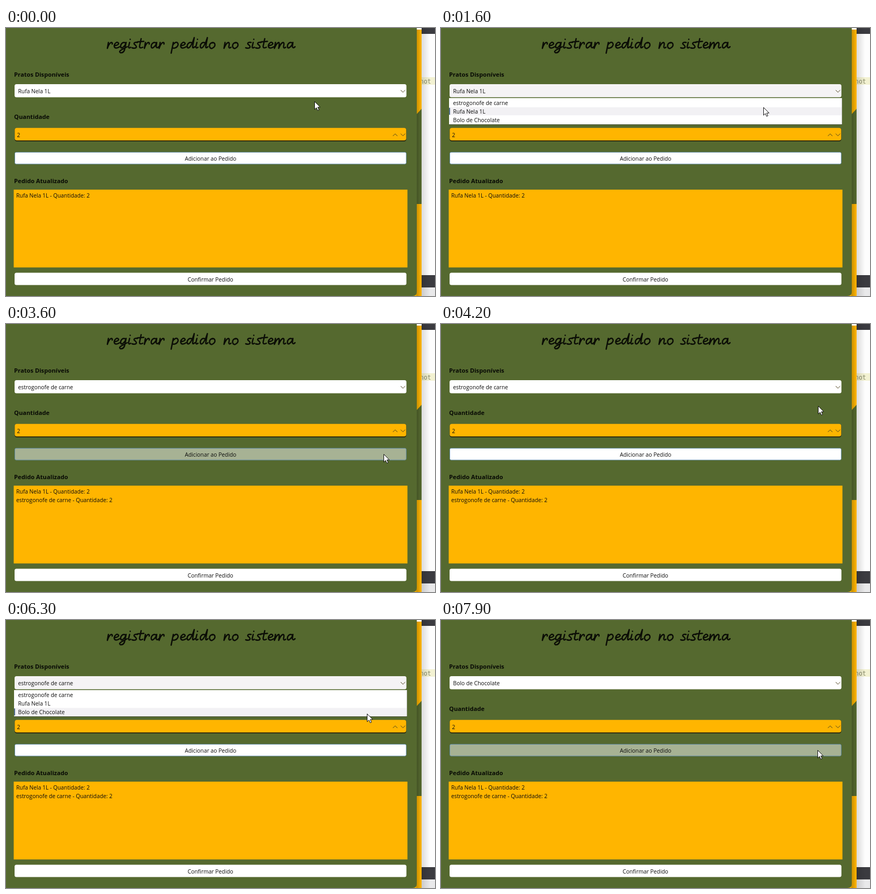
Write an HTML page that moves like this. It is 800x501 px and loops after 8000 ms.

```html
<!DOCTYPE html>
<html lang="pt-BR">
<head>
<meta charset="utf-8">
<title>Registrar pedido</title>
<style>
  html, body { margin: 0; width: 100%; height: 100%; overflow: hidden; background: #fff; }
  svg { display: block; width: 800px; height: 501px; }
  text { font: 10.3px "Open Sans", "Noto Sans", sans-serif; fill: #0c0c0c; white-space: pre; }
  .label { font-size: 11.2px; font-weight: 700; fill: #080a05; }
  .mid { text-anchor: middle; }
  .code { font: 11.5px "DejaVu Sans Mono", monospace; fill: #8b8d6c; }
  .heading { font: italic 28px "Open Sans", sans-serif; fill: transparent; }
  .pen { fill: none; stroke: #0b0d06; stroke-width: 2.5; stroke-linecap: round; stroke-linejoin: round; }
  .chevron { fill: none; stroke: #4f431f; }
  .field { fill: #fff; }
  .orange { fill: #ffb500; }
  .green { fill: #55692f; }
  .dark { fill: #3b3b40; }
</style>
</head>
<body>
<svg viewBox="0 0 800 501">
  <defs>
    <linearGradient id="shade">
      <stop offset="0" stop-color="#000" stop-opacity=".22"/>
      <stop offset="1" stop-color="#000" stop-opacity="0"/>
    </linearGradient>
  </defs>

  <!-- windows behind the dialog -->
  <rect x="760" width="40" height="501" fill="#fdfdfd"/>
  <rect class="dark" x="775" width="25" height="11"/>
  <rect x="774" y="92" width="26" height="14" fill="#f3f2d2"/>
  <text class="code" x="772" y="103.5">not</text>
  <rect class="dark" x="774" y="462" width="26" height="23"/>
  <rect x="774" y="485" width="26" height="16" fill="#e9e9ea"/>
  <rect x="775" width="16" height="501" fill="url(#shade)" opacity=".6"/>
  <rect class="orange" x="750" y="3" width="25" height="498"/>
  <path class="green" d="M764 163L775 151V329H764Z"/>
  <rect x="765" y="3" width="10" height="498" fill="url(#shade)"/>

  <!-- dialog -->
  <path class="green" d="M0 0H766V493Q766 501 758 501H0Z"/>
  <text class="heading mid" x="364" y="39">registrar pedido no sistema</text>
  <g id="title" class="pen"></g>

  <text class="label" x="15" y="90.5">Pratos Disponíveis</text>
  <rect id="combo" x="16" y="105" width="730.7" height="24.4" rx="3.5"/>
  <text id="choice" x="22.5" y="122"></text>
  <path class="chevron" d="M736 116l4.2 4.2l4.2-4.2"/>

  <text class="label" x="15" y="170">Quantidade</text>
  <rect x="16.3" y="187" width="730" height="24.8" rx="4" fill="#17160a"/>
  <rect class="orange" x="16.3" y="186.8" width="730" height="23.5" rx="4"/>
  <text x="20.5" y="203.5">2</text>
  <path class="chevron" d="M721.5 202l4.2-4.2l4.2 4.2M736 197.5l4.2 4.2l4.2-4.2"/>

  <rect id="add" x="16.5" y="232.3" width="729.8" height="21.9" rx="2.5" stroke="#5a8cb8" stroke-width=".8"/>
  <text class="mid" x="381.5" y="247.8">Adicionar ao Pedido</text>

  <text class="label" x="15" y="289.5">Pedido Atualizado</text>
  <rect class="orange" x="14.4" y="302.2" width="734.2" height="145.4"/>
  <text id="first" x="19" y="316.8"></text>
  <text id="second" x="19" y="333"></text>

  <rect class="field" x="16" y="457.6" width="730.7" height="23" rx="3.5"/>
  <text class="mid" x="381.3" y="473.8">Confirmar Pedido</text>

  <g id="menu">
    <rect x="15" y="131" width="733" height="50" fill="#2b3519"/>
    <rect class="field" x="15" y="131" width="732.7" height="49.2"/>
    <g id="mark">
      <rect x="16" width="731" height="15" fill="#f2f1f4"/>
      <rect x="15" y="1" width="2" height="13" fill="#54708f"/>
    </g>
    <g id="options"></g>
  </g>

  <g id="pointer">
    <path id="arrow" d="M0 0V14.6L3.4 11.4L5.7 16.7L8.1 15.6L5.8 10.5H10.4Z" fill="#fff" stroke="#111"/>
    <path id="beam" d="M-3-6.5H-.7L0-6L.7-6.5H3M0-6V6M-3 6.5H-.7L0 6L.7 6.5H3" fill="none" stroke="#3c3420"/>
  </g>
</svg>
<script>
const $ = id => document.getElementById(id);
const LOOP = 8000, STEP = 100;
const dishes = ["estrogonofe de carne", "Rufa Nela 1L", "Bolo de Chocolate"];
const orderLine = i => dishes[i] + " - Quantidade: 2";

// Pen strokes per letter, baseline at 0, with the advance width.
const bowl = "M10-10Q4-13 1-6Q0 0 4-1Q9-4 ";
const glyphs = {
  r: [12, "M2-11L0 0Q3-9 7-11Q10-11 9-8"],
  e: [12, "M1-5Q9-6 9-9Q8-12 5-11Q0-8 1-3Q3 2 11-3"],
  g: [15.5, bowl + "11-11L8 3Q6 9 0 8Q-3 6 2 3L13-3"],
  i: [7.5, "M2-11L0-3Q0 1 4-2M3-17l.2.3"],
  s: [11, "M9-11Q2-12 3-8Q8-4 7-2Q5 1-1-1"],
  t: [11, "M5-18L2-4Q2 1 8-2M-2-12L10-13"],
  a: [15.5, bowl + "11-11L10-3Q11 1 15-3"],
  p: [16, "M3-11L-1 9M2-6Q6-12 10-11Q14-8 10-3Q6 1 1-1"],
  d: [17, bowl + "14-20L11-3Q11 1 15-3"],
  o: [14.5, "M7-11Q1-10 1-4Q2 1 6 0Q12-3 11-8Q9-12 6-10"],
  n: [15, "M2-11L0 0Q4-10 8-11Q11-11 9-3Q9 1 13-2"],
  m: [23.5, "M2-11L0 0Q4-10 8-11Q10-11 8 0Q12-10 16-11Q19-11 17-3Q17 1 21-2"]
};

function write(word, x) {
  return [...word].map(c => {
    const [width, d] = glyphs[c];
    const path = `<path transform="translate(${x} 38)" d="${d}"/>`;
    x += width;
    return path;
  }).join("");
}

$("title").innerHTML = write("registrar", 189) + write("pedido", 309) +
  write("no", 406.5) + write("sistema", 448);
$("options").innerHTML = dishes.map((dish, i) =>
  `<text x="22.5" y="${144 + i * 16.2}">${dish}</text>`).join("");
$("first").textContent = orderLine(1);

// time, x, y
const route = [
  [0, 575, 137], [400, 590, 120], [1000, 590, 120], [1300, 601, 146],
  [1600, 601, 148], [1900, 605, 141], [2200, 605, 141], [2800, 718, 196],
  [3200, 705, 243], [3700, 704, 243], [4200, 703, 153], [4700, 690, 119],
  [5000, 690, 119], [5500, 673, 182], [6300, 673, 175], [6700, 673, 174],
  [7300, 702, 243], [LOOP, 702, 243]
];

function pointerAt(t) {
  const i = route.findIndex(p => p[0] > t);
  const [t0, x0, y0] = route[i - 1], [t1, x1, y1] = route[i];
  const u = (t - t0) / (t1 - t0), k = u * u * (3 - 2 * u);
  return [x0 + (x1 - x0) * k, y0 + (y1 - y0) * k];
}

const within = (v, a, b) => v >= a && v < b;
const show = (id, on) => $(id).setAttribute("visibility", on ? "inherit" : "hidden");

function render(t) {
  const [x, y] = pointerAt(t);
  const open = within(t, 700, 2200) || within(t, 4900, 6700);
  const chosen = t < 2200 ? 1 : t < 6700 ? 0 : 2;
  const row = y < 131.5 ? chosen : Math.min(2, Math.floor((y - 131.5) / 16.2));
  const pressed = within(t, 3400, 3600);
  const overAdd = within(y, 232, 255);
  const overSpin = !open && x < 720 && within(y, 187, 212);

  $("choice").textContent = dishes[chosen];
  $("combo").setAttribute("fill", open ? "#f5f3f5" : "#fff");
  $("add").setAttribute("fill", pressed ? "#869669" : overAdd ? "#a7b294" : "#fff");
  $("second").textContent = t >= 3600 ? orderLine(0) : "";
  $("menu").setAttribute("display", open ? "inline" : "none");
  $("mark").setAttribute("transform", `translate(0 ${132 + row * 16.2})`);
  $("pointer").setAttribute("transform", `translate(${Math.round(x) + .5} ${Math.round(y) + .5})`);
  show("arrow", !overSpin);
  show("beam", overSpin);
}

function tick() {
  const t = performance.now() % LOOP;
  render(Math.floor(t / STEP) * STEP);
  requestAnimationFrame(tick);
}
tick();
</script>
</body>
</html>
```
